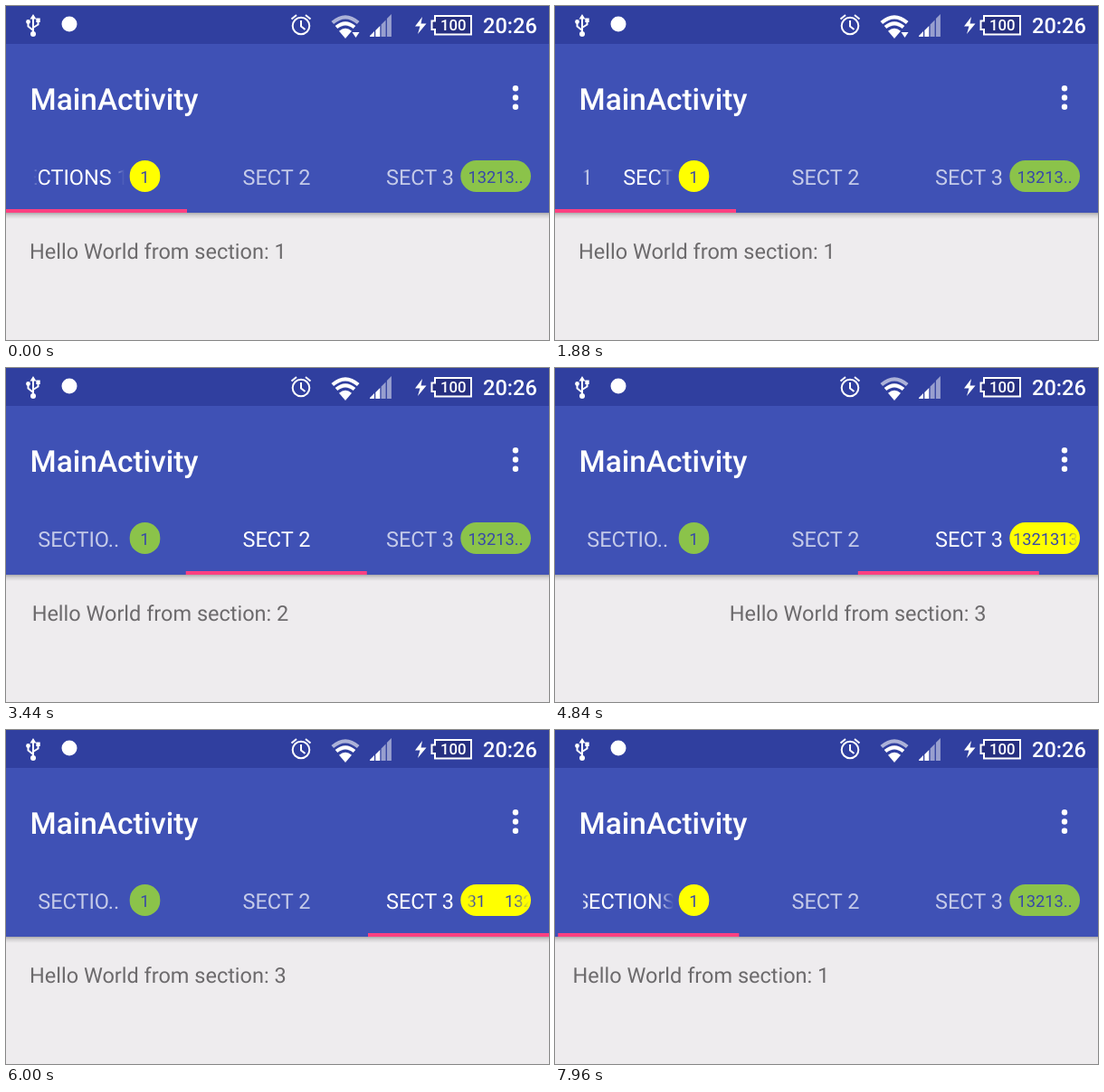
An HTML page for the animation above (8000 ms loop, 600 by 370 pixels).

```html
<!DOCTYPE html>
<html lang="en">
<head>
<meta charset="utf-8">
<title>Tabs with badges</title>
<style>
  html, body { margin: 0; width: 100%; height: 100%; overflow: hidden; background: #eeecee; }
  svg { display: block; }
  text { font-family: Roboto, sans-serif; white-space: pre; text-rendering: geometricPrecision; }
  .tab { font-size: 23.5px; fill: #fff; }
  .badge { font-size: 18.3px; fill: #3848a8; }
  .page { font-size: 23.5px; fill: #6c6a6c; }
</style>
</head>
<body>
<svg width="600" height="370" viewBox="0 0 600 370">
  <defs>
    <linearGradient id="shadow" x2="0" y2="1">
      <stop offset="0" stop-color="#000" stop-opacity=".28"/>
      <stop offset=".4" stop-color="#000" stop-opacity=".12"/>
      <stop offset="1" stop-color="#000" stop-opacity="0"/>
    </linearGradient>
    <linearGradient id="barLeft"><stop stop-color="#3f51b5"/><stop offset="1" stop-color="#3f51b5" stop-opacity="0"/></linearGradient>
    <linearGradient id="barRight"><stop stop-color="#3f51b5" stop-opacity="0"/><stop offset="1" stop-color="#3f51b5"/></linearGradient>
    <linearGradient id="badgeLeft"><stop stop-color="#ff0"/><stop offset="1" stop-color="#ff0" stop-opacity="0"/></linearGradient>
    <linearGradient id="badgeRight"><stop stop-color="#ff0" stop-opacity="0"/><stop offset="1" stop-color="#ff0"/></linearGradient>
  </defs>

  <rect width="600" height="370" fill="#eeecee"/>
  <g id="pages">
    <text class="page" y="280">Hello World from section: 1</text>
    <text class="page" y="280">Hello World from section: 2</text>
    <text class="page" y="280">Hello World from section: 3</text>
  </g>

  <rect y="229" width="600" height="7" fill="url(#shadow)"/>
  <rect width="600" height="229" fill="#3f51b5"/>
  <rect width="600" height="42" fill="#303f9f"/>

  <!-- status bar -->
  <g fill="#fff">
    <g fill="none" stroke="#fff" stroke-width="2">
      <path d="M30 13V30M30 27L24.5 22.5V18M30 24L35.5 20.5V16"/>
      <circle cx="326" cy="22" r="9.3"/>
      <path d="M326 16V22.5L330.5 26M315.5 14.5L321 10M336.5 14.5L331 10"/>
      <path d="M474 11H514V31.5H474V26H470.5V16.5H474Z" fill="#262f80"/>
    </g>
    <path d="M30 9L33.5 14.5H26.5ZM33.3 13.5H37.7V17.9H33.3Z"/>
    <circle cx="24.5" cy="17.5" r="2.4"/>
    <circle cx="30" cy="31" r="3"/>
    <circle cx="70" cy="20" r="8.5"/>
    <g fill="none" stroke="#fff" stroke-width="4">
      <path id="wifiOuter" d="M360.8 18.6Q375 6 389.2 18.6"/>
      <path d="M365 23.6Q375 15 385 23.6"/>
    </g>
    <path d="M368 27.8Q375 21.8 382 27.8L375 36Z"/>
    <path id="wifiData" d="M382.5 29H390.5L386.5 35Z"/>
    <path d="M402 34V33L407 28V34ZM408.3 34V27L413.3 22V34Z"/>
    <path d="M414.6 34V20.5L419.6 15.5V34ZM420.9 34V14L425.9 9V34Z" opacity=".5"/>
    <path d="M460 12L452 22.5H457.5L455 31L464.5 19.5H458.5Z"/>
    <text x="494.3" y="27" font-size="16.8" font-weight="500" text-anchor="middle">100</text>
    <text x="527" y="30" font-size="23.6" font-weight="500">20:26</text>
  </g>

  <!-- toolbar -->
  <g fill="#fff">
    <text x="26.6" y="115" font-size="33.33" font-weight="500">MainActivity</text>
    <circle cx="563" cy="91.3" r="3.2"/>
    <circle cx="563" cy="101.5" r="3.2"/>
    <circle cx="563" cy="111.7" r="3.2"/>
  </g>

  <!-- tabs -->
  <text id="short1" class="tab" x="35.2" y="197.6">SECTIO..</text>
  <svg id="scroll1" x="31" y="165" width="100" height="50" viewBox="31 165 100 50">
    <g>
      <text class="tab" y="197.6">SECTIONS 1</text>
      <text class="tab" x="162" y="197.6">SECTIONS 1</text>
    </g>
    <rect class="fade" x="31" y="165" width="7" height="50" fill="url(#barLeft)"/>
    <rect x="111" y="165" width="20" height="50" fill="url(#barRight)"/>
  </svg>
  <text id="tab2" class="tab" x="261.5" y="197.6">SECT 2</text>
  <text id="tab3" class="tab" x="420" y="197.6">SECT 3</text>

  <rect id="badge1" x="136.7" y="171" width="33.6" height="35" rx="16.8"/>
  <text class="badge" x="153.3" y="195.8" text-anchor="middle">1</text>
  <rect id="badge3" x="502.3" y="171" width="77.7" height="35" rx="17.5"/>
  <text id="short3" class="badge" x="541" y="195.8" text-anchor="middle">13213..</text>
  <svg id="scroll3" x="507" y="181" width="71" height="16" viewBox="507 181 71 16">
    <g>
      <text class="badge" y="195.8">13213131</text>
      <text class="badge" x="103" y="195.8">13213131</text>
    </g>
    <rect class="fade" x="507" y="181" width="12" height="16" fill="url(#badgeLeft)"/>
    <rect x="562" y="181" width="16" height="16" fill="url(#badgeRight)"/>
  </svg>

  <rect id="indicator" y="225" width="200" height="4" fill="#ff4081"/>
</svg>

<script>
const LOOP = 8;
const SCROLL_SPEED = 50;
const FADE_DISTANCE = 20;
const INDICATOR_LAG = 0.013;

// Each swipe: finger drag from start to release, then a decelerating settle.
const swipes = [
  { from: 0, to: 1, start: 2.95, release: 3.135, drag: 0.3, settle: 0.48 },
  { from: 1, to: 2, start: 4.64, release: 4.76, drag: 0.3, settle: 0.48 },
  { from: 2, to: 1, start: 6.5, release: 6.68, drag: 0.3, settle: 0.48 },
  { from: 1, to: 0, start: 7.68, release: 7.8, drag: 0.5, settle: 0.3 },
];

const $ = id => document.getElementById(id);
const clamp = v => Math.min(1, Math.max(0, v));
const show = (id, on) => $(id).setAttribute('visibility', on ? 'visible' : 'hidden');
const moveX = (node, x) => node.setAttribute('transform', `translate(${x} 0)`);

function pagePosition(t) {
  const swipe = swipes.findLast(s => t >= s.start);
  if (!swipe) return 0;
  const { from, to, start, release, drag, settle } = swipe;
  const dragged = drag * clamp((t - start) / (release - start));
  const settled = 1 - (1 - clamp((t - release) / settle)) ** 5;
  return from + (to - from) * (dragged + (1 - drag) * settled);
}

function selection(t) {
  const swipe = swipes.findLast(s => t >= s.release);
  return swipe ? { tab: swipe.to, since: swipe.release } : { tab: 0, since: -0.48 };
}

function marquee(id, shortId, active, left, period, elapsed) {
  show(id, active);
  show(shortId, !active);
  const offset = Math.min(period, SCROLL_SPEED * elapsed);
  moveX($(id).querySelector('g'), left - offset);
  $(id).querySelector('.fade').setAttribute('opacity', clamp(offset / FADE_DISTANCE));
}

function draw(t) {
  const position = pagePosition(t);
  [...$('pages').children].forEach((page, i) => moveX(page, 26 + 600 * (i - position)));
  $('indicator').setAttribute('x', 200 * pagePosition(t - INDICATOR_LAG));

  const { tab, since } = selection(t);
  ['short1', 'tab2', 'tab3'].forEach((id, i) =>
    $(id).setAttribute('fill-opacity', i === tab ? 1 : 0.7));
  [['badge1', 0], ['badge3', 2]].forEach(([id, i]) =>
    $(id).setAttribute('fill', i === tab ? '#ff0' : '#8bc34a'));
  marquee('scroll1', 'short1', tab === 0, 31.2, 162, t - since);
  marquee('scroll3', 'short3', tab === 2, 510, 103, t - since);

  $('wifiOuter').setAttribute('opacity', t > 1.4 && t < 4.36 ? 1 : 0.6);
  show('wifiData', t < 2.1);
}

function frame() {
  draw(performance.now() / 1000 % LOOP);
  requestAnimationFrame(frame);
}
frame();
</script>
</body>
</html>
```
